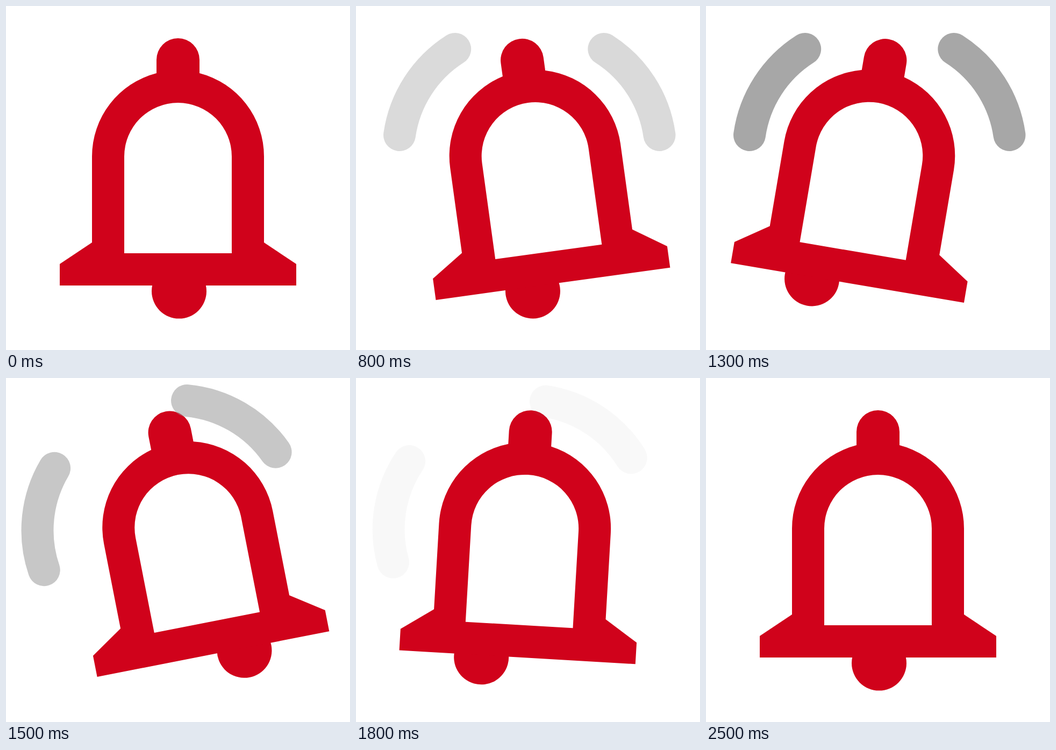
Write an HTML page that moves like this. It is 640 by 640 pixels and loops after 2.8 s.

```html
<!DOCTYPE html>
<html lang="en">
<head>
<meta charset="utf-8">
<title>Ringing bell</title>
<style>
  html, body { margin: 0; width: 100%; height: 100%; overflow: hidden; background: #fff; }
  svg { display: block; width: 100%; height: 100%; }
</style>
</head>
<body>
<svg viewBox="0 0 640 640">
  <g fill="#d0021b">
    <circle id="clapper" cx="322" cy="530.6" r="51"/>
    <path id="bell" fill-rule="evenodd" d="M280 125V100a40 40 0 0 1 80 0V125A160 160 0 0 1 480 280V440L540 480V520H100V480L160 440V280A160 160 0 0 1 280 125Z
      M220 460V280a100 100 0 0 1 200 0V460Z"/>
  </g>
  <g id="waves" fill="none" stroke="#979797" stroke-width="60" stroke-linecap="round">
    <path d="M81 240A228 228 0 0 1 184.2 80"/>
    <path d="M564.5 240A228 228 0 0 0 461.3 80"/>
  </g>
</svg>
<script>
const LOOP = 2800, STEP = 100;
const [clapper, bell, waves] = ['clapper', 'bell', 'waves'].map(id => document.getElementById(id));

// Moments in ms at which each part reverses; the first and last are its start and end.
const bellTurns = [545, 1040, 1245, 1443, 1686, 1852];
const clapperTurns = [760, 1071, 1257, 1440, 1686, 1964, 2445];
const waveTurns = [1300, 1454, 1678, 1853];

// Sine-eased motion between the angles that angleAt gives for successive turns.
function swing(t, turns, angleAt) {
  const last = turns.length - 1;
  if (t <= turns[0]) return angleAt(0);
  if (t >= turns[last]) return angleAt(last);
  const i = turns.findIndex(time => time > t) - 1;
  const p = (t - turns[i]) / (turns[i + 1] - turns[i]);
  const eased = (1 - Math.cos(Math.PI * p)) / 2;
  return angleAt(i) + (angleAt(i + 1) - angleAt(i)) * eased;
}

// Alternates left and right, at rest at both ends.
const sway = (i, size, turns) => i % (turns.length - 1) ? size * (-1) ** i : 0;

function rotate(part, angle, x, y) {
  part.setAttribute('transform', `rotate(${angle} ${x} ${y})`);
}

function draw(now) {
  const t = Math.floor((now % LOOP) / STEP) * STEP;
  rotate(bell, swing(t, bellTurns, i => sway(i, 15, bellTurns)), 320, 180);
  rotate(clapper, swing(t, clapperTurns, i => sway(i, i < 5 ? 29.5 : 9.8, clapperTurns)), 319.5, 195);
  rotate(waves, swing(t, waveTurns, i => -30 * (i % 2)), 320, 320);
  waves.setAttribute('opacity', Math.max(0, Math.min((t - 553) / 694, (1836 - t) / 635)));
}

const start = performance.now();
function tick() {
  draw(performance.now() - start);
  requestAnimationFrame(tick);
}
tick();
</script>
</body>
</html>
```
